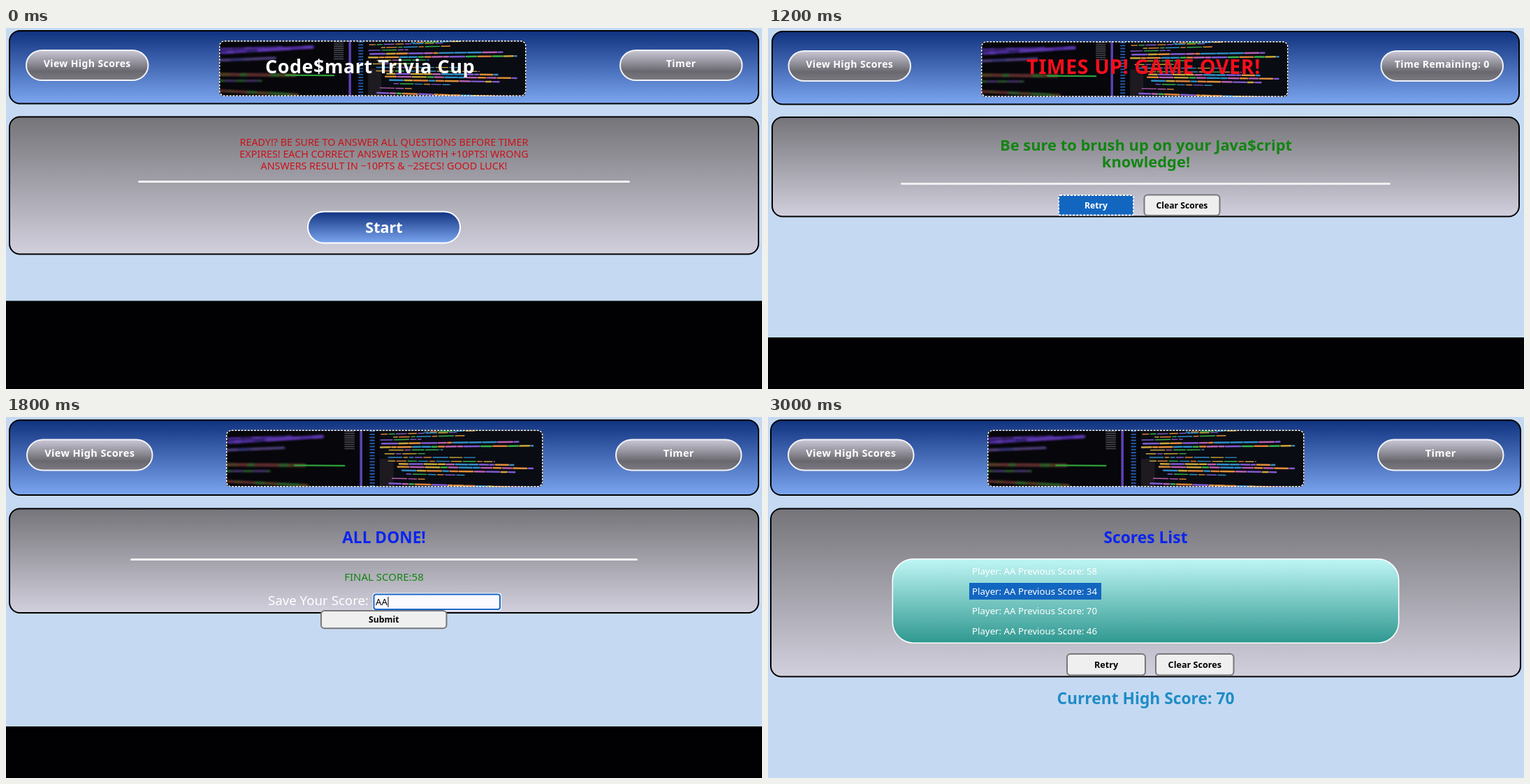
An HTML page for the animation above (3600 ms loop, 1082 px wide and 518 px high).

```html
<!DOCTYPE html>
<html lang="en">
<head>
<meta charset="utf-8">
<title>Code quiz</title>
<style>
  html, body { margin: 0; width: 100%; height: 100%; overflow: hidden; background: #010103; }
  svg { display: block; width: 1082px; height: 518px; }
  text { font-family: "Noto Sans", "Open Sans", sans-serif; white-space: pre; }
  .b { font-weight: 700; }
</style>
</head>
<body>
<svg id="stage" viewBox="0 0 1082 518"></svg>
<script>
const SCENE_MS = 600;
const BLUE = '#1266c0', INK = '#0b24f0', GREEN = '#128512';

let seed = 11;
const rand = () => (seed = seed * 16807 % 2147483647) / 2147483647;

// Boxes are given by their outer edges; the border lies inside them.
const box = (l, t, r, b, fill, { rx = 0, stroke = 'none', sw = 0, dash = 'none' } = {}) =>
  `<rect x="${l + sw / 2}" y="${t + sw / 2}" width="${r - l - sw}" height="${b - t - sw}" rx="${rx}"
    fill="${fill}" stroke="${stroke}" stroke-width="${sw}" stroke-dasharray="${dash}"/>`;

const text = (str, x, y, size, fill, { bold = false, anchor = 'middle', gap = 0 } = {}) =>
  `<text x="${x}" y="${y}" font-size="${size}" fill="${fill}" text-anchor="${anchor}"
    letter-spacing="${gap}" class="${bold ? 'b' : ''}">${str}</text>`;

const heading = (str, x, y, size, fill) => text(str, x, y, size, fill, { bold: true });

const gradient = (id, ...stops) =>
  `<linearGradient id="${id}" x2="0" y2="1">${stops.map(([at, color]) =>
    `<stop offset="${at}" stop-color="${color}"/>`).join('')}</linearGradient>`;

const streak = (x1, y1, x2, y2, color, width) =>
  `<path d="M${x1} ${y1}L${x2} ${y2}" stroke="${color}" stroke-width="${width}"/>`;

// A row of code: coloured words laid end to end.
function codeRow(y, from, to, colors, width, slope = 0) {
  let out = '';
  for (let x = from; x < to;) {
    const end = Math.min(to, x + 5 + rand() * 16);
    const color = colors[Math.floor(rand() * colors.length)];
    out += streak(x, y + slope * (x - from), end, y + slope * (end - from), color, width);
    x = end + 2.5;
  }
  return out;
}

function bannerArt() {
  const bright = ['#e0903a', '#c9a63c', '#38b34a', '#2f8fc8', '#d8823a', '#7f5ad0', '#b860b0'];
  const rows = [[3, 275, 345], [6, 215, 320], [10, 232, 330], [14, 214, 270], [19, 216, 405],
    [24, 214, 425], [28, 226, 300], [33, 220, 275], [38, 225, 345], [43, 225, 372], [47, 240, 398],
    [51, 238, 425], [56, 244, 400], [61, 250, 330], [67, 230, 275], [74, 226, 420]];
  const right = rows.map(([y, a, b]) =>
    codeRow(y, a, b, bright, b > 390 ? 2.4 : 1.4, (y - 36) * .0008)).join('');
  const violet = ['#4a2b96', '#33246c', '#5a35a8'], moss = ['#4f3a20', '#2f5a28', '#5a2c2c'];
  const left =
    codeRow(12, 0, 90, violet, 3, -0.03) +
    codeRow(17, 4, 135, violet, 5, -0.06) +
    codeRow(28, 0, 82, ['#33306f', '#4a3a72'], 4, -0.04) +
    codeRow(48, 0, 110, moss, 5, 0.01) +
    codeRow(57, 0, 60, ['#2c5a2b', '#45306a'], 3) +
    codeRow(71, 0, 112, moss, 4, 0.05);
  const cells = n => Array.from({ length: n }, (_, i) => i);
  return box(0, 0, 439, 79, '#06060b') +
    box(212, 0, 439, 79, '#0a0c13') +
    box(213, 40, 232, 79, '#1d1a20') +
    `<g stroke-linecap="round"><g filter="url(#soft)">${left}</g>` +
    streak(95, 49, 164, 49.5, '#2fa03a', 2) + right + '</g>' +
    cells(9).map(i => streak(164, 2 + i * 3, 178, 2 + i * 3, '#44444c', 1.6)).join('') +
    streak(187, 0, 187, 79, '#5b42b0', 3.5) +
    cells(19).map(i => streak(199, 2 + i * 4.2, 206, 2 + i * 4.2, '#2456a0', 2)).join('');
}

const pill = (l, t, w, h, label, size) =>
  box(l, t, l + w, t + h, 'url(#steel)', { rx: h / 2, stroke: '#f2f2f6', sw: 2 }) +
  text(label, l + w / 2, t + h * .56, size, '#fff', { bold: true, gap: .4 });

function header({ l, r, t, large, left, right, banner, status }) {
  const [h, pw, ph, bw, bh, size] = large ? [109.5, 181.5, 46, 453.5, 82, 14.5] : [106.5, 176.5, 45, 439.5, 80, 14];
  const top = t + 15;
  return box(l, t, r, t + h, 'url(#sky)', { rx: 15, stroke: '#000', sw: 2 }) +
    pill(left, t + 28, pw, ph, 'View High Scores', size) +
    pill(right, t + 28, pw, ph, status, size) +
    `<use href="#art" transform="translate(${banner} ${top}) scale(${bw / 439} ${bh / 79})" clip-path="url(#round)"/>` +
    box(banner, top, banner + bw, top + bh, 'none', { rx: 7, stroke: '#fff', sw: 1.4, dash: '3 1.6' });
}

const page = bottom => box(0, 0, 1082, bottom, '#c5daf2');
const panel = (l, t, r, b) => box(l, t, r, b, 'url(#ash)', { rx: 15, stroke: '#000', sw: 2 });
const rule = (l, r, y) => box(l, y - 1.5, r, y + 1.5, '#f0f0f2', { rx: 1.5 });

const button = (l, t, r, b, label, size, active) =>
  (active
    ? box(l, t, r, b, BLUE, { rx: 2, stroke: '#fff', sw: 2, dash: '3 2' })
    : box(l, t, r, b, '#efefef', { rx: 5, stroke: '#77777a', sw: 2 })) +
  heading(label, (l + r) / 2, (t + b) / 2 + 4.5, size, active ? '#fff' : '#000');

function list(l, t, r, b, items, x, y, step, size, mark) {
  return box(l, t, r, b, 'url(#teal)', { rx: 30, stroke: '#fff', sw: 1.6 }) + mark +
    items.map((s, i) => text(s, x, y + i * step, size, '#fff', { anchor: 'start' })).join('');
}

function start() {
  const lines = ['READY!? BE SURE TO ANSWER ALL QUESTIONS BEFORE TIMER',
    'EXPIRES! EACH CORRECT ANSWER IS WORTH +10PTS! WRONG',
    'ANSWERS RESULT IN −10PTS &amp; −2SECS! GOOD LUCK!'];
  return page(391.5) +
    header({ l: 4, r: 1078, t: 3, left: 28, right: 878, banner: 305, status: 'Timer' }) +
    text('Code$mart Trivia Cup', 521, 65, 27, '#fff', { bold: true, gap: .5 }) +
    panel(4, 126.5, 1078, 325.5) +
    lines.map((s, i) => text(s, 541, 168.5 + i * 17, 14.3, '#cc1119')).join('') +
    rule(189, 893, 220.5) +
    box(431, 262.5, 651, 309.5, 'url(#sky)', { rx: 23, stroke: '#fff', sw: 2 }) +
    heading('Start', 541, 294, 21.5, '#fff');
}

function question() {
  const kinds = ['a scripting', 'an assembly', 'a compiled'];
  const answers = kinds.map(k => `JavaScript is ${k} language used to make the website interactive`);
  return page(444) +
    header({ l: 4, r: 1076, t: 4, left: 28, right: 876.5, banner: 304.5, status: 'Time Remaining: 45' }) +
    panel(4, 127, 1076, 340) +
    heading('What is JavaScript?', 540, 175.5, 21.8, '#000') +
    list(189, 197, 891, 323.5, [...answers, 'None of the mentioned'], 300, 221, 30, 14.5,
      box(296, 233, 796, 258.5, BLUE, { rx: 4 }));
}

function gameOver() {
  return page(444) +
    header({ l: 5, r: 1076, t: 4, left: 28.5, right: 876.5, banner: 305, status: 'Time Remaining: 0' }) +
    text('TIMES UP! GAME OVER!', 537.5, 66, 28.5, '#fb0d1b', { bold: true, gap: .6 }) +
    panel(5, 127, 1076, 271.5) +
    heading('Be sure to brush up on your Java$cript', 541, 176, 21.9, GREEN) +
    heading('knowledge!', 541, 200, 21.9, GREEN) +
    rule(190, 891, 223.5) +
    button(415, 239, 524, 269.5, 'Retry', 12.2, true) +
    button(537.5, 238.5, 647.5, 270, 'Clear Scores', 12.2);
}

function done(dx, dy, bottom, active) {
  return page(bottom) + `<g transform="translate(${dx} ${dy})">` +
    header({ l: 4, r: 1078, t: 3.5, large: true, left: 29, right: 872, banner: 315, status: 'Timer' }) +
    panel(4, 130.5, 1078, 282) +
    heading('ALL DONE!', 541, 180.5, 22.7, INK) +
    rule(178, 904, 204.5) +
    text('FINAL SCORE:58', 541, 234.5, 15, GREEN) +
    text('Save Your Score:', 447, 270, 18.7, '#fff') +
    box(524.5, 252.5, 709, 278, '#fff', { rx: 4 }) +
    box(525.5, 253.5, 708, 277, '#fafaff', { rx: 3, stroke: '#1a66c8', sw: 2 }) +
    text('AA', 529, 270, 13.2, '#000', { anchor: 'start' }) +
    box(546.5, 258, 547.5, 273, '#000') +
    button(450, 277, 631.5, 304.2, 'Submit', 12.2, active) + '</g>';
}

function scores() {
  const items = [58, 34, 70, 46].map(n => `Player: AA Previous Score: ${n}`);
  return page(518) +
    header({ l: 3, r: 1078, t: 3.5, large: true, left: 28, right: 872, banner: 314, status: 'Timer' }) +
    panel(3, 130.5, 1078, 373.5) +
    heading('Scores List', 540.5, 180.5, 22.8, INK) +
    list(177.5, 203, 903.5, 325, items, 292, 226, 28.7, 13.25, box(288, 238, 477, 262, BLUE)) +
    button(427, 339, 541, 371.5, 'Retry', 12.6) +
    button(554, 339, 667.5, 371.5, 'Clear Scores', 12.6) +
    heading('Current High Score: 70', 540.5, 411.5, 22.8, '#1f8cc6');
}

const scenes = [start(), question(), gameOver(), done(0, 0, 444, false), done(-2, 1, 471, true), scores()];
const stage = document.getElementById('stage');
stage.innerHTML = '<defs>' +
  gradient('sky', [0, '#10327f'], [1, '#7ca6f0']) +
  gradient('ash', [0, '#757479'], [1, '#d2d0dd']) +
  gradient('steel', [0, '#cbc9d7'], [.7, '#69686f'], [1, '#7b7a82']) +
  gradient('teal', [0, '#bff6f5'], [1, '#2f9890']) +
  '<filter id="soft"><feGaussianBlur stdDeviation="1.5 .9"/></filter>' +
  `<clipPath id="round">${box(0, 0, 439, 79, '#000', { rx: 7 })}</clipPath>` +
  `<g id="art">${bannerArt()}</g></defs>` +
  scenes.map(s => `<g class="scene">${s}</g>`).join('');

const groups = [...stage.querySelectorAll('.scene')];
function draw() {
  const current = Math.floor(performance.now() / SCENE_MS) % groups.length;
  groups.forEach((g, i) => { g.style.display = i === current ? '' : 'none'; });
  requestAnimationFrame(draw);
}
draw();
</script>
</body>
</html>
```
